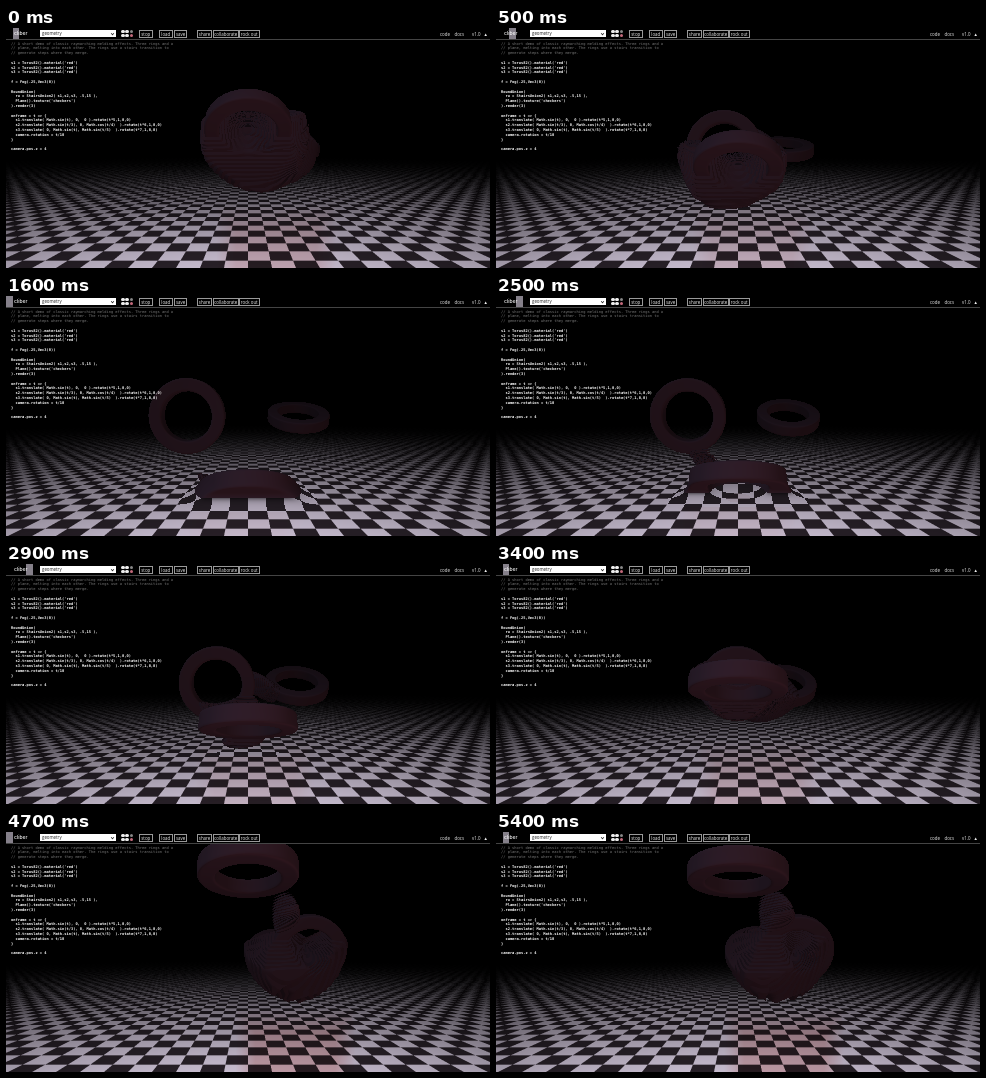
An HTML page with a canvas that plays this animation: 484 by 240 pixels, repeating every 5.5 s.

```html
<!DOCTYPE html>
<html lang="en">
<head>
<meta charset="utf-8">
<title>Melding rings</title>
<style>
html, body { margin: 0; width: 484px; height: 240px; overflow: hidden; background: #000; }
canvas, pre, header, header * { position: absolute; margin: 0; }
canvas { left: 0; top: 0; }
pre {
  left: 5px; top: 13.6px; color: #fff;
  font: bold 3.7px/4.8px "DejaVu Sans Mono", monospace;
}
pre i { color: #777; font-style: normal; font-weight: normal; }
header {
  left: 0; top: 0; width: 484px; height: 11px; background: #000;
  border-bottom: 1px solid #444; color: #eee;
  font: 4.4px/7px "Open Sans", sans-serif; white-space: nowrap;
}
header b { left: 8px; top: 2px; font: 500 5px/7px Inter, sans-serif; color: #fff; }
#beat { left: 0; top: 0; width: 6.7px; height: 11px; background: #85808a; }
#menu { left: 34px; top: 2px; width: 76px; height: 7px; background: #fff; color: #222; text-indent: 2px; }
#menu::after {
  content: ""; position: absolute; right: 2px; top: 2px; width: 2px; height: 2px;
  border: solid #222; border-width: 0 .7px .7px 0; transform: rotate(45deg) scale(.8);
}
.btn { top: 2px; height: 6px; line-height: 6px; border: .6px solid #999; text-align: center; }
.link { top: 2.5px; }
.dot { width: 3.6px; height: 3.6px; border-radius: 50%; background: #eee; }
</style>
</head>
<body>
<canvas id="view" width="484" height="240"></canvas>
<pre><i>// A short demo of classic raymarching melding effects. Three rings and a
// plane, melting into each other. The rings use a stairs transition to
// generate steps where they merge.</i>

s1 = Torus82().material('red')
s2 = Torus82().material('red')
s3 = Torus82().material('red')

f = Fog(.25,Vec3(0))

RoundUnion(
  ru = StairsUnion2( s1,s2,s3, .5,15 ),
  Plane().texture('checkers')
).render(3)

onframe = t =&gt; {
  s1.translate( Math.sin(t), 0,  0 ).rotate(t*5,1,0,0)
  s2.translate( Math.sin(t/3), 0, Math.cos(t/4)  ).rotate(t*6,1,0,0)
  s3.translate( 0, Math.sin(t), Math.sin(t/5)  ).rotate(t*7,1,0,0)
  camera.rotation = t/10
}

camera.pos.z = 4</pre>
<header id="bar">
  <div id="beat"></div><b>cliber</b>
  <div id="menu">geometry</div>
</header>
<script>
const W = 484, H = 240, CX = 242, CY = 120, FOCAL = 248, EYE = 4;
const LOOP = 5500, STEP = 100, BEAT = 420;
const FOG = 0.25, ROUND = 0.25, STAIR = 0.5, TREAD = STAIR / 15;
const { sin, cos, sqrt, min, max, abs, floor, exp, PI } = Math;
const ctx = view.getContext('2d');

// toolbar
function add(cls, text, style) {
  const el = document.createElement('span');
  el.className = cls;
  el.textContent = text;
  Object.assign(el.style, style);
  bar.append(el);
}
[['stop', 133, 11.5], ['load', 153, 11.5], ['save', 168, 11], ['share', 191, 13],
 ['collaborate', 207, 23.5], ['rock out', 233, 18.5]].forEach(([text, x, w]) =>
  add('btn', text, { left: x + 'px', width: w + 'px' }));
[['code', 434], ['docs', 448.5], ['v1.0', 466], ['▲', 477.5]].forEach(([text, x]) =>
  add('link', text, { left: x + 'px' }));
for (let i = 0; i < 6; i++)
  add('dot', '', {
    left: 115 + (i % 3) * 4.4 + 'px', top: 1.8 + floor(i / 3) * 4 + 'px',
    background: i === 5 ? '#c66a7c' : i === 2 ? '#888' : '#eee'
  });

// distance fields
let rings = [];

function pose(sec) {
  const t = 285.61 + sec;
  const ring = (x, y, z, deg) =>
    ({ x, y, z, c: cos(deg * PI / 180), s: sin(deg * PI / 180) });
  rings = [
    ring(sin(t), 0, 0, 86 + 5 * sec),
    ring(sin(t / 3), 0, cos(t / 4 + 0.74), 13 + 6 * sec),
    ring(0, sin(t), sin(t / 5), -41 + 7 * sec)
  ];
}

function torus(r, x, y, z) {
  x -= r.x; y -= r.y; z -= r.z;
  const v = z * r.c - y * r.s;
  let q = sqrt(x * x + v * v) - 0.5, h = y * r.c + z * r.s;
  q *= q; q *= q; q *= q;
  h *= h; h *= h; h *= h;
  return sqrt(sqrt(sqrt(q + h))) - 0.1;
}

function stairs(a, b) {
  const m = min(a, b);
  if (a + b > STAIR + 2 * TREAD) return m;
  const u = b - STAIR, w = 2 * TREAD, k = u - a + TREAD;
  return min(m, 0.5 * (u + a + abs(k - w * floor(k / w) - TREAD)));
}

const solid = (x, y, z) => stairs(
  stairs(torus(rings[0], x, y, z), torus(rings[1], x, y, z)),
  torus(rings[2], x, y, z));

function scene(x, y, z) {
  const a = solid(x, y, z), b = y + 1;
  const u = max(ROUND - a, 0), v = max(ROUND - b, 0);
  return max(ROUND, min(a, b)) - sqrt(u * u + v * v);
}

function normal(x, y, z) {
  const e = 0.004;
  const a = scene(x + e, y - e, z - e), b = scene(x - e, y - e, z + e);
  const c = scene(x - e, y + e, z - e), d = scene(x + e, y + e, z + e);
  const nx = a - b - c + d, ny = -a - b + c + d, nz = -a + b - c + d;
  const n = sqrt(nx * nx + ny * ny + nz * nz) || 1;
  return [nx / n, ny / n, nz / n];
}

// colours
function floorColor(x, z, dist) {
  const white = (floor(x * 5) + floor(z * 5) + 1) & 1;
  const k = 365 * exp(-FOG * dist);
  return white ? [k * 0.96, k * 0.91, k] : [k * 0.19, k * 0.155, k * 0.19];
}

function ringColor([nx, ny, nz], dist) {
  const left = max(0, -0.6 * nx + 0.6 * ny + 0.5 * nz);
  const right = max(0, 0.65 * nx - 0.1 * ny + 0.7 * nz);
  const under = max(0, -ny), k = exp(-FOG * dist);
  return [
    k * (36 + 40 * left + 42 * right + 26 * under),
    k * (22 + 32 * left + 17 * right + 10 * under),
    k * (30 + 48 * left + 20 * right + 14 * under)
  ];
}

function put(data, px, py, c) {
  const i = (py * W + px) * 4;
  data[i] = c[0]; data[i + 1] = c[1]; data[i + 2] = c[2]; data[i + 3] = 255;
}

// the bare floor, smoothed with 3 x 3 samples
const ground = ctx.createImageData(W, H);
for (let py = 0; py < H; py++)
  for (let px = 0; px < W; px++) {
    const sum = [0, 0, 0];
    for (let k = 0; k < 9; k++) {
      const x = px + (k % 3 + 0.5) / 3, y = py + (floor(k / 3) + 0.5) / 3;
      if (y < CY + 1) continue;
      const depth = FOCAL / (y - CY), side = (x - CX) / FOCAL * depth;
      const c = floorColor(side, EYE - depth, sqrt(depth * depth + side * side + 1));
      for (let j = 0; j < 3; j++) sum[j] += c[j] / 9;
    }
    put(ground.data, px, py, sum);
  }

// red glow on the floor in front of the rings
function glow(data) {
  const mid = 262 + 28 * rings[0].x, power = 0.55 + 0.45 * rings[0].x;
  for (let py = 175; py < H; py++)
    for (let px = floor(mid - 60); px < mid + 60; px++) {
      const edge = min(1, (60 - abs(px - mid)) / 20, (py - 175) / 25);
      const i = (py * W + px) * 4, k = power * max(0, edge);
      data[i] *= 1 - 0.06 * k;
      data[i + 1] *= 1 - 0.2 * k;
      data[i + 2] *= 1 - 0.22 * k;
    }
}

// distance at which the ray comes near any ring
function entry(dx, dy, dz) {
  let first = Infinity;
  for (const r of rings) {
    const z = r.z - EYE, b = r.x * dx + r.y * dy + z * dz;
    const disc = b * b - (r.x * r.x + r.y * r.y + z * z) + 0.9;
    if (disc > 0) first = min(first, b - sqrt(disc));
  }
  return first;
}

function trace(px, py) {
  let dx = (px + 0.5 - CX) / FOCAL, dy = (CY - py - 0.5) / FOCAL;
  const len = sqrt(dx * dx + dy * dy + 1), dz = -1 / len;
  dx /= len; dy /= len;
  let t = max(0.5, entry(dx, dy, dz));
  const end = dy < 0 ? min(7, -1 / dy) : 7;
  for (let i = 0; i < 64 && t < end; i++) {
    const x = dx * t, y = dy * t, z = EYE + dz * t, d = scene(x, y, z);
    if (d < 0.004) {
      const a = solid(x, y, z);
      if (a > ROUND) return null;
      const n = normal(x, y, z);
      if (a < y + 1) return ringColor(n, t);
      const lit = 0.35 + 0.65 * max(0, n[1]);
      return floorColor(x, z, t).map(v => v * lit);
    }
    t += d * 0.88;
  }
  return null;
}

const cache = [];
function picture(i) {
  if (cache[i]) return cache[i];
  pose(i * STEP / 1000);
  const img = new ImageData(new Uint8ClampedArray(ground.data), W, H);
  glow(img.data);
  for (let py = 0; py < H; py++)
    for (let px = 135; px < 350; px++) {
      const c = trace(px, py);
      if (c) put(img.data, px, py, c);
    }
  return cache[i] = img;
}

const COUNT = LOOP / STEP;
let start = null, shown = -1;
function tick(now) {
  if (start === null) start = now;
  const i = floor((now - start) % LOOP / STEP);
  if (i !== shown) {
    shown = i;
    ctx.putImageData(picture(i), 0, 0);
    const n = floor((i * STEP + BEAT - 390) / BEAT) + 1;
    beat.style.left = n % 4 * 6.7 + 'px';
  } else {
    picture((i + 1) % COUNT);
  }
  requestAnimationFrame(tick);
}
requestAnimationFrame(tick);
</script>
</body>
</html>
```
